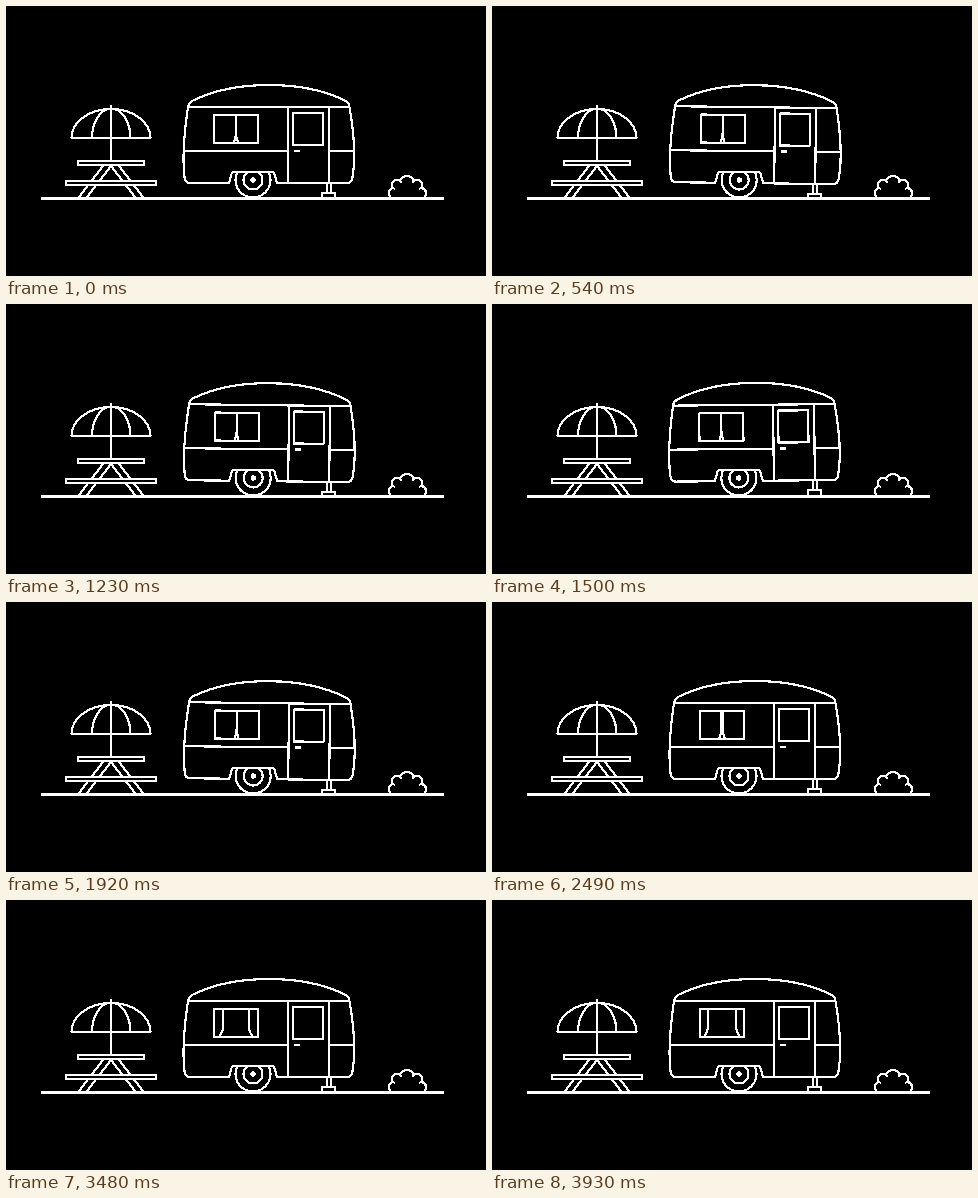
These frames come from a looping animation (480 px wide and 270 px high, 4.5 s). An HTML page without scripts:

```html
<!DOCTYPE html>
<html lang="en">
<head>
<meta charset="utf-8">
<title>Caravan</title>
<style>
  @property --tilt { syntax: "<angle>"; inherits: false; initial-value: 0deg; }

  html, body { margin: 0; width: 100%; height: 100%; overflow: hidden; background: #000; }
  svg { display: block; width: 100%; height: 100%; }
  .line {
    fill: none; stroke: #fff; stroke-width: 2.2; stroke-linejoin: round;
    shape-rendering: crispEdges;
  }
  .solid { fill: #000; }

  .caravan, .curtain {
    animation: 4500ms cubic-bezier(.33, 0, .67, 1) infinite;
  }
  .caravan {
    transform-origin: 247px 191px;
    transform: rotate(var(--tilt));
    animation-name: rock;
  }
  .curtain { animation-name: open; }

  /* six equal swings of a third of a second */
  @keyframes rock {
    0%, 5.11% { --tilt: 0deg; }
    12.52%, 27.33%, 42.15% { --tilt: .7deg; }
    19.93%, 34.74% { --tilt: -.7deg; }
    49.56%, 100% { --tilt: 0deg; }
  }

  @keyframes open {
    0%, 51.85% { d: path("M230 109V126Q230 132 228 136"); }
    82.96%, 100% { d: path("M216 109V126Q216 132 212 136"); }
  }
</style>
</head>
<body>
<svg viewBox="0 0 480 270" class="line">
  <defs>
    <clipPath id="arch"><rect x="225" y="166" width="45" height="30"/></clipPath>
    <path id="leg" d="M97 160L73 191M105 160L81 191"/>
  </defs>

  <!-- picnic table and parasol -->
  <use href="#leg"/>
  <use href="#leg" transform="matrix(-1 0 0 1 210 0)"/>
  <path d="M105 99V154M65.5 132A39.5 29 0 0 1 144.5 132ZM86 132A19 29 0 0 1 124.500 132"/>
  <rect class="solid" x="72" y="155" width="66" height="4"/>
  <rect class="solid" x="60" y="175" width="90" height="4"/>

  <!-- bush -->
  <path d="M385 191A5 5 0 0 1 387 182A5 5 0 0 1 394 175A7.5 7.5 0 0 1 408 175A5 5 0 0 1 415 182A5 5 0 0 1 418 191M394 175L396 177M408 175L406 177M387 182L389 183M415 182L413 183"/>

  <g class="caravan">
    <g clip-path="url(#arch)">
      <circle cx="247" cy="174" r="17.5"/>
      <circle cx="247" cy="174" r="9.5"/>
    </g>
    <circle cx="247" cy="174" r="2.7" fill="#fff" stroke="none"/>

    <path d="M321 177V187M325 177V187M316 192V187H329V192"/>

    <!-- shell -->
    <path d="M184 177Q179 177 178.5 171Q175.5 145 182 101Q182.5 97 186 95Q218 79 263 79Q308 79 340 95Q343 97 343.5 101Q351 145 346.5 171Q346 177 341 177H271L268.5 168Q268 166 266 166H228Q226 166 225.5 168L223 177Z"/>
    <path d="M182 101H344M178 145H282M323 145H348M282 101V177M323 101V177"/>

    <!-- door window and handle -->
    <rect x="287" y="107" width="30" height="32"/>
    <path d="M288 145H294"/>

    <rect x="208" y="109" width="44" height="28"/>
    <path class="curtain" d="M230 109V126Q230 132 228 136"/>
    <path class="curtain" d="M230 109V126Q230 132 228 136" transform="matrix(-1 0 0 1 460 0)"/>
  </g>

  <path d="M35 192.5H438" stroke-width="3"/>
</svg>
</body>
</html>
```
